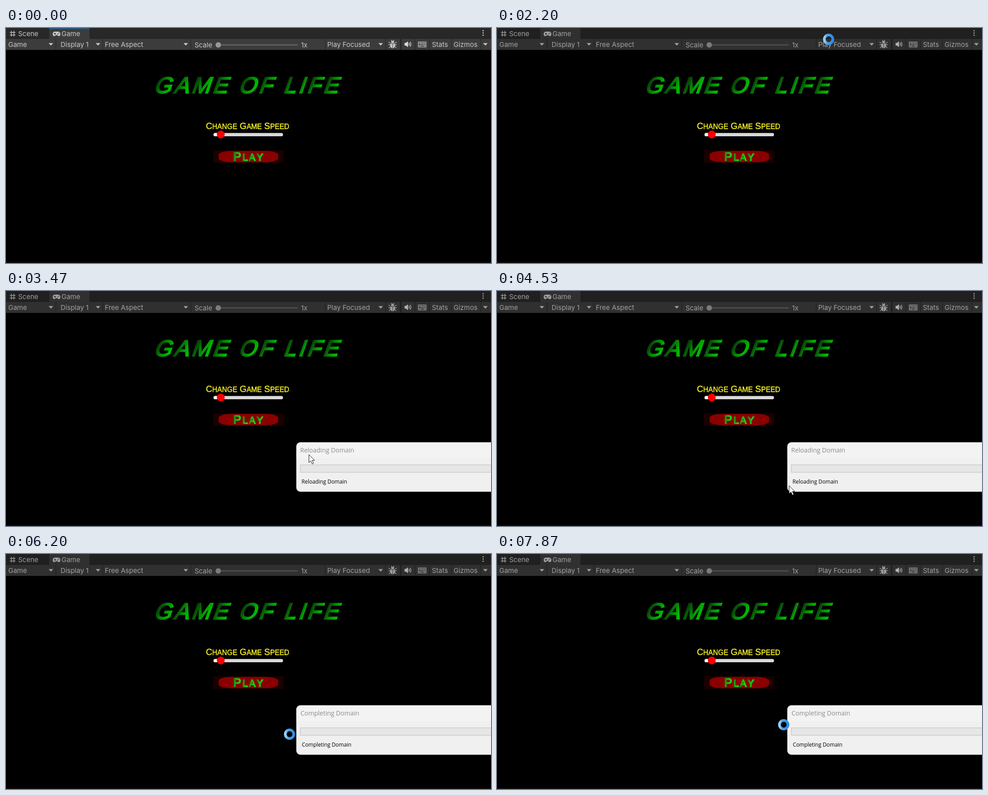
An HTML page that plays this animation: 1075x521 px, repeating every 8 s.

```html
<!DOCTYPE html>
<html lang="en">
<head>
<meta charset="utf-8">
<title>Game view</title>
<style>
  html, body { margin: 0; width: 100%; height: 100%; overflow: hidden; background: #000; }
  svg { display: block; width: 100%; height: 100%; }
  .ui { font: 15px Inter, sans-serif; fill: #c8c8c8; }
  .sans { font-family: "Liberation Sans", Arial, sans-serif; }
  .dialog { font-family: "Open Sans", "Noto Sans", sans-serif; }
</style>
</head>
<body>
<svg viewBox="0 0 1075 521" preserveAspectRatio="none">
  <defs>
    <linearGradient id="titleFill" x1="0" y1=".35" x2=".85" y2=".6">
      <stop offset="0" stop-color="#062c06"/>
      <stop offset=".5" stop-color="#068006"/>
      <stop offset="1" stop-color="#00b800"/>
    </linearGradient>
    <linearGradient id="playFill" x1="0" y1=".4" x2=".9" y2=".6">
      <stop offset="0" stop-color="#2a6a08"/>
      <stop offset=".4" stop-color="#20b010"/>
      <stop offset="1" stop-color="#18d818"/>
    </linearGradient>
    <linearGradient id="ringFill">
      <stop offset="0" stop-color="#9ad2f8"/>
      <stop offset=".3" stop-color="#4ba3ec"/>
      <stop offset="1" stop-color="#2f8ae2"/>
    </linearGradient>
    <filter id="soft" x="-5%" y="-20%" width="110%" height="140%">
      <feGaussianBlur stdDeviation=".7"/>
    </filter>
  </defs>
  <rect width="1075" height="521"/>
  <path d="M0 519.5H1075" stroke="#22171b"/>

  <g class="ui">
    <rect width="1075" height="24" fill="#282828"/>
    <rect x="96" width="89" height="24" fill="#3c3c3c"/>
    <rect id="focusLine" x="95.500" width="89.500" height="2" fill="#2c5d87"/>
    <rect y="24" width="1075" height="25" fill="#3c3c3c"/>
    <path d="M0 23.5H96M185 23.5H1075M0 48.5H1075" stroke="#232323"/>
    <path id="dividers" stroke="#232323"/>
    <rect x="873" y="24" width="4" height="24" fill="#2a2a2a"/>

    <path d="M12 6V19M17.500 6V19M8.500 10H21M8.500 15.500H21" stroke="#c4c4c4" stroke-width="1.4"/>
    <text x="27" y="18">Scene</text>
    <path d="M108.500 8H115.500Q120.500 8.500 120.500 13Q120.500 18 117 18Q115 18 113.800 16H110.200Q109 18 107 18Q103.500 18 103.500 13Q103.500 8.500 108.500 8Z"/>
    <path d="M108.500 10.500V15M106.200 12.700H110.800" stroke="#3c3c3c" stroke-width="1.4"/>
    <circle cx="114.500" cy="13.700" r="1.1" fill="#3c3c3c"/>
    <circle cx="117" cy="11.500" r="1.1" fill="#3c3c3c"/>
    <text x="123" y="18">Game</text>
    <circle cx="1057.500" cy="6" r="1.5"/><circle cx="1057.500" cy="11" r="1.5"/><circle cx="1057.500" cy="16" r="1.5"/>

    <text x="5" y="42">Game</text>
    <text x="121" y="42">Display 1</text>
    <text x="219" y="42">Free Aspect</text>
    <text x="418" y="43">Scale</text>
    <rect x="470" y="36" width="177" height="3" rx="1.500" fill="#5e5e5e"/>
    <circle cx="470.500" cy="37.500" r="6" fill="#999"/>
    <text x="654" y="43">1x</text>
    <text x="712" y="42">Play Focused</text>
    <text x="944" y="42">Stats</text>
    <text x="992" y="42">Gizmos</text>
    <path id="carets"/>

    <path d="M848 31L852 34M866 31L862 34M848 37H866M849 44L853 40M865 44L861 40M854 27L856 30M860 27L858 30" fill="none" stroke="#c4c4c4" stroke-width="1.4"/>
    <ellipse cx="857" cy="38" rx="5.500" ry="7"/>
    <path d="M853 31A4.200 3.500 0 0 1 861 31Z"/>
    <path d="M852 34.500H862M857 35V45" stroke="#3c3c3c"/>
    <path d="M883.500 33H886.500L891 29.500V42.500L886.500 39H883.500Z" fill="#ddd"/>
    <path d="M893 33Q895 36 893 39M895.500 31Q899.500 36 895.500 41" fill="none" stroke="#ddd" stroke-width="1.5"/>
    <rect x="914" y="31" width="17" height="11" fill="none" stroke="#c4c4c4" stroke-width="1.300"/>
    <path d="M914 34.500H931M914 38.500H931M918 31V34.500M922 31V34.500M926.500 31V34.500M920 34.500V38.500M924.500 34.500V38.500M928 34.500V38.500M917.500 38.500V42M927.500 38.500V42" stroke="#c4c4c4" stroke-width="1.100"/>
    <rect id="tint" width="1075" height="49" fill="#000" opacity=".2"/>
  </g>

  <g id="title" class="sans" transform="translate(326.300 143.600) skewX(-19.300)" fill="url(#titleFill)" stroke="url(#titleFill)" stroke-width="2.800"/>
  <text class="sans" x="443" y="224" font-size="15.600" fill="#f4ef26" stroke="#f4ef26" stroke-width=".45"><tspan font-size="19.500">C</tspan>HANGE<tspan font-size="19.500"> G</tspan>AME<tspan font-size="19.500"> S</tspan>PEED</text>

  <rect x="460" y="232.800" width="154" height="7.200" rx="3.600" fill="#d9d9d9"/>
  <rect x="460" y="232.800" width="14" height="7.200" rx="3.600" fill="#fff"/>
  <circle cx="476" cy="236" r="8.700" fill="#f80000"/>

  <rect x="459" y="271" width="156" height="28" fill="#1a0000"/>
  <path d="M471.500 279Q480 272.500 498 272.500H577Q595 272.500 603 279V291Q595 297.500 577 297.500H498Q480 297.500 471.500 291Z" fill="#8a0000" filter="url(#soft)"/>
  <g id="play" class="sans" transform="translate(503.500 293.500)" fill="url(#playFill)" stroke="url(#playFill)" stroke-width="2"/>

  <g id="dialog" class="dialog">
    <rect x="643.500" y="335.500" width="460" height="109.500" rx="9" fill="#f0f0f0"/>
    <path d="M643.500 371V344.500A9 9 0 0 1 652.500 335.500H1080V371Z" fill="#f3f3f3"/>
    <rect x="643.500" y="335.500" width="460" height="109.500" rx="9" fill="none" stroke="#8a8a8a" stroke-width=".7"/>
    <rect x="652.500" y="385.500" width="460" height="16.500" fill="#e6e6e6" stroke="#bcbcbc"/>
    <text id="caption" x="652" y="358" font-size="14" fill="#8c8c8c"/>
    <text id="label" x="655" y="427" font-size="11.800" fill="#000"/>
  </g>

  <path id="arrow" d="M.5 .8V18.300L4.600 14.500L7.600 21.500L10.600 20.200L7.600 13.400H13.200Z" fill="#fff" stroke="#111" stroke-width="1"/>
  <circle id="ring" r="9.400" fill="none" stroke="url(#ringFill)" stroke-width="6"/>
</svg>
<script>
const LOOP = 8000, FPS = 15;
const el = id => document.getElementById(id);
const show = (node, on) => node.setAttribute("visibility", on ? "visible" : "hidden");
const place = (node, x, y) => node.setAttribute("transform", `translate(${x} ${y})`);

// Each letter is its own text so that the gradient restarts on it.
function letters(id, text, size, gap, small = 1) {
  let x = 0;
  [...text].forEach((ch, i) => {
    const fontSize = i ? size * small : size;
    if (ch === " ") { x += fontSize * 0.278 + gap; return; }
    const node = document.createElementNS("http://www.w3.org/2000/svg", "text");
    node.setAttribute("x", x);
    node.setAttribute("font-size", fontSize);
    node.textContent = ch;
    el(id).append(node);
    x += node.getComputedTextLength() + gap;
  });
}
letters("title", "GAME OF LIFE", 50, 5.3);
letters("play", "PLAY", 26.5, 2.8, 0.8);

el("dividers").setAttribute("d",
  [110, 214, 409, 707, 841, 906, 938, 987, 1052].map(x => `M${x + .5} 24V48`).join(""));
el("carets").setAttribute("d",
  [99.5, 204, 398.5, 830.5, 1062.5].map(x => `M${x - 5} 33.500h10l-5 5.500Z`).join(""));

// Pointer path: tick, x, y, kind. Arrow by its tip, ring by its centre.
const A = "arrow", R = "ring";
const path = [
  [33, 735, 25, R], [37, 716.5, 198.5, R], [41, 716.5, 198.5, R], [43, 756, 262, R],
  [44, 735, 315, A], [46, 677, 377, A], [48, 677, 377, A], [52, 671, 362, A],
  [55, 618, 405, A], [58, 640, 438, A], [60, 640, 438, A], [65, 657, 419, A],
  [66, 657, 419, A], [67, 678, 414, A], [68, 647, 431, A], [69, 647, 431, A],
  [72, 655, 421, A], [76, 655, 421, A], [79, 639, 423, A], [81, 639, 423, A],
  [84, 627, 427, R], [90, 614.5, 414.5, R], [92, 614.5, 414.5, R], [93, 628.5, 399.5, R],
  [96, 638.5, 390.5, R], [98, 638.5, 390.5, R], [99, 656, 396, A], [100, 643, 399, A],
  [102, 643, 399, A], [105, 639, 379, A], [109, 639, 379, A], [113, 651, 383, A],
  [115, 640, 377, R], [118, 635.5, 378.5, R]
];

function pointerAt(tick) {
  const i = path.findLastIndex(key => key[0] <= tick);
  if (i < 0) return null;
  const a = path[i], b = path[i + 1] || a;
  const p = b === a ? 0 : (tick - a[0]) / (b[0] - a[0]);
  return { x: a[1] + (b[1] - a[1]) * p, y: a[2] + (b[2] - a[2]) * p, kind: a[3] };
}

function messageAt(tick) {
  if (tick < 71) return "Reloading Domain";
  return tick < 78 ? "" : "Completing Domain";
}

function draw(time) {
  const tick = Math.floor((time + 4) * FPS / 1000);
  show(el("focusLine"), tick < 27);
  show(el("tint"), tick >= 29);
  show(el("dialog"), tick >= 35);
  const message = messageAt(tick);
  const shift = message[0] === "C" ? 0.7 : 0;
  for (const [id, x] of [["caption", 652], ["label", 655]]) {
    el(id).textContent = message;
    el(id).setAttribute("x", x + shift);
  }

  const pointer = pointerAt(tick);
  const waiting = tick >= 12 && tick < 27;
  for (const kind of [A, R]) {
    show(el(kind), waiting || (pointer && pointer.kind === kind));
    if (pointer) place(el(kind), pointer.x, pointer.y);
  }
  if (waiting) {
    place(el(A), 874, 15);
    place(el(R), 905.5, 18.5);
  }
}

function loop(now) {
  draw(now % LOOP);
  requestAnimationFrame(loop);
}
draw(0);
requestAnimationFrame(loop);
</script>
</body>
</html>
```
